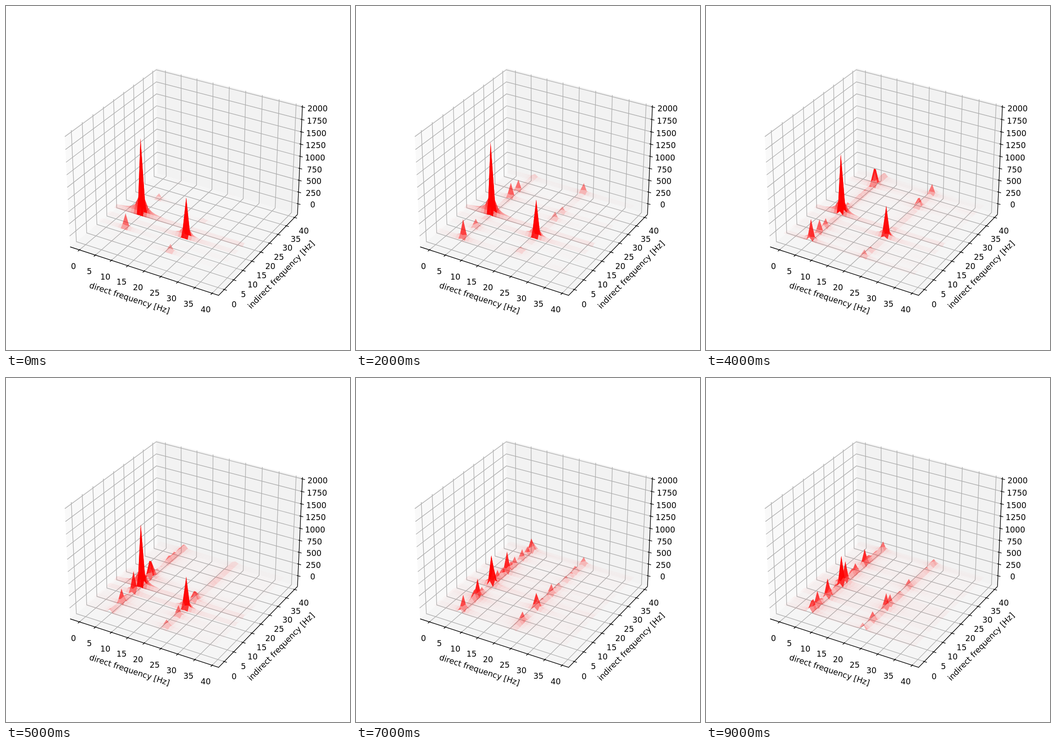
Animation, 748 px wide and 748 px high, one loop 10000 ms. Source, as an HTML page:

```html
<!DOCTYPE html>
<html lang="en">
<head>
<meta charset="utf-8">
<title>Spectrum</title>
<style>
  html, body { margin: 0; width: 100%; height: 100%; overflow: hidden; background: #fff; }
  svg { display: block; width: 100vw; height: 100vh; }
  text { font: 17.3px "DejaVu Sans", sans-serif; text-anchor: middle; }
</style>
</head>
<body>
<svg viewBox="0 0 748 748">
  <g id="axes"></g>
  <g id="surface" fill="#f00"></g>
</svg>
<script>
const LO = -2.95, SPAN = 44.8, HI = LO + SPAN;
const ZLO = -228, ZSPAN = 2262, ZHI = ZLO + ZSPAN;
const SIZE = 40, STEP = 1.01;

// Perspective camera at elevation 30, azimuth -60
function project(x, y, z) {
  const p = 1.1905 * ((x - LO) / SPAN - 0.5);
  const q = 1.1905 * ((y - LO) / SPAN - 0.5);
  const r = 0.8929 * ((z - ZLO) / ZSPAN - 0.5);
  const k = 3107 / (10 - 0.433 * p + 0.75 * q - 0.5 * r);
  return [391.2 + k * (0.866 * p + 0.5 * q),
          370.3 - k * (-0.25 * p + 0.433 * q + 0.866 * r)];
}

const pt = p => p[0].toFixed(2) + ' ' + p[1].toFixed(2);
const path = points => 'M' + points.map(p => pt(project(...p))).join('L');

function drawAxes() {
  const pane = (fill, ...pts) => `<path d="${path(pts)}Z" fill="${fill}"/>`;
  const line = (color, ...pts) =>
    `<path d="${path(pts)}" fill="none" stroke="${color}" stroke-width="1.38"/>`;
  const label = (s, [x, y], dx, dy) =>
    `<text x="${x + dx}" y="${y + dy}" dy=".36em">${s}</text>`;
  const title = (s, x, y, angle) =>
    `<text transform="translate(${x} ${y}) rotate(${angle})" dy=".31em">${s}</text>`;
  const IN = 0.37, OUT = 0.75, GRID = '#b0b0b0', INK = '#000';

  const panes = pane('#f9f9f9', [LO, LO, ZLO], [LO, HI, ZLO], [LO, HI, ZHI], [LO, LO, ZHI])
    + pane('#f2f2f2', [LO, HI, ZLO], [HI, HI, ZLO], [HI, HI, ZHI], [LO, HI, ZHI])
    + pane('#f5f5f5', [LO, LO, ZLO], [HI, LO, ZLO], [HI, HI, ZLO], [LO, HI, ZLO]);
  let grid = '', ticks = '', words = '';

  for (let n = 0; n <= 8; n++) {
    const v = n * 5, z = n * 250, f = n / 8;
    grid += line(GRID, [v, LO, ZLO], [v, HI, ZLO], [v, HI, ZHI])
      + line(GRID, [HI, v, ZLO], [LO, v, ZLO], [LO, v, ZHI])
      + line(GRID, [LO, LO, z], [LO, HI, z], [HI, HI, z]);
    ticks += line(INK, [v, LO - OUT, ZLO], [v, LO + IN, ZLO])
      + line(INK, [HI - IN, v, ZLO], [HI + OUT, v, ZLO])
      + line(INK, [HI - IN, HI, z], [HI + OUT, HI, z]);
    words += label(v, project(v, LO, ZLO), -13 - f, 35.2)
      + label(v, project(HI, v, ZLO), 21.4 - 1.2 * f, 32 - 3.5 * f)
      + label(z, project(HI, HI, z), 32 + f, 1.5 + 2 * f);
  }
  ticks += line(INK, [LO, LO, ZLO], [HI, LO, ZLO], [HI, HI, ZLO])
    + line(INK, [HI, HI, ZLO], [HI, HI, ZHI]);
  words += title('direct frequency [Hz]', 268.5, 635.5, 18.1)
    + title('indirect frequency [Hz]', 598.5, 584.5, -45.7);
  document.getElementById('axes').innerHTML = panes + grid + ticks + words;
}

function random(seed) {
  return () => {
    seed = (seed * 16807) % 2147483647;
    return seed / 2147483647;
  };
}

// Height of the main peak in each state, and the rows of the strongest artefacts
const MAIN = [1560, 1670, 1480, 1345, 1240, 1270, 1070, 640, 590, 630];
const SPIKES = [[8, 25], [2, 26, 30], [2, 26, 30, 8], [1, 33, 26, 6], [1, 33, 34, 5],
  [12, 20, 21, 6], [23, 10, 11, 34], [24, 9, 17, 2, 37], [24, 9, 4, 28], [18, 9, 28, 4]];

// Noise rises from state to state while the main peak sinks
function column(n) {
  const next = random(n * 7919 + 101);
  const level = 3 + 19 * n;
  const rows = Array.from({ length: SIZE }, () =>
    Math.min(230, level * Math.sqrt(-Math.log(next()))));
  const top = 450 - 150 * Math.exp(-n / 2);
  const decay = 0.9 - 0.5 * Math.exp(-0.7 * n);
  SPIKES[n].forEach((row, rank) => { rows[row] = top * decay ** rank; });
  rows[16] = MAIN[n];
  return rows;
}

// Periodic line shape with long tails along the direct axis
const shape = d => 1 / Math.hypot(1, Math.sin(Math.PI * d / SIZE) * SIZE / Math.PI / 0.22);

function surface(rows) {
  // The second column repeats the first, four rows lower and about half as high
  const height = (i, j) =>
    rows[j] * shape(i - 8) + 0.52 * rows[(j + 4) % SIZE] * shape(i - 24);
  const grid = Array.from({ length: SIZE }, (_, j) =>
    Array.from({ length: SIZE }, (_, i) => {
      const z = height(i, j);
      return { z, s: pt(project(i * STEP - 0.4, j * STEP - 0.1, z)) };
    }));
  let out = '';
  for (let j = SIZE - 2; j >= 0; j--) {
    for (let i = 0; i < SIZE - 1; i++) {
      const quad = [grid[j][i], grid[j][i + 1], grid[j + 1][i + 1], grid[j + 1][i]];
      const alpha = Math.min(1, quad.reduce((sum, c) => sum + c.z, 0) / 4 / 270);
      if (alpha > 0.004)
        out += `<path d="M${quad.map(c => c.s).join('L')}Z" fill-opacity="${alpha.toFixed(3)}"/>`;
    }
  }
  return out;
}

const layer = document.getElementById('surface');
const pictures = MAIN.map((_, n) => surface(column(n)));
let shown = -1;

function update(time) {
  const n = Math.floor(time / 1000) % pictures.length;
  if (n !== shown) {
    shown = n;
    layer.innerHTML = pictures[n];
  }
}

function frame() {
  update(performance.now() - begin);
  requestAnimationFrame(frame);
}

drawAxes();
const begin = performance.now();
frame();
</script>
</body>
</html>
```
